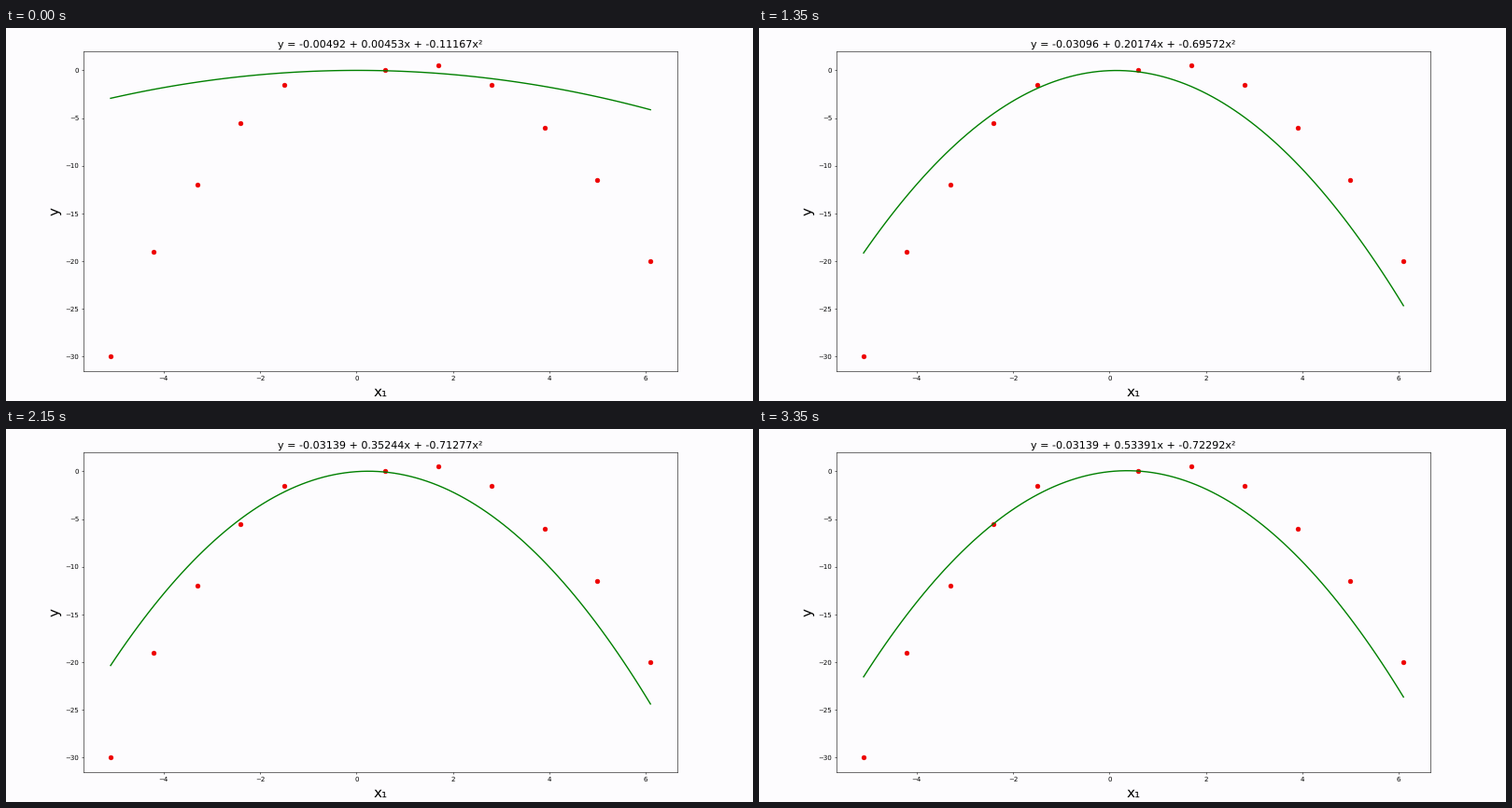
A matplotlib script that plays this animation: 800x400 px, repeating every 3450 ms.

```python
import math

import numpy as np
import matplotlib.pyplot as plt
from matplotlib.animation import FuncAnimation

plt.rcParams["font.family"] = "DejaVu Sans"
plt.rcParams["text.hinting"] = "none"

PAPER = "#fdfcfe"
STEP_MS, HOLD_MS, LOOP_MS, TICK_MS = 100, 350, 3450, 50
RATE, TOLERANCE = 5e-5, 1e-6
EPOCHS = 10            # descent steps between two plots

X = np.array([-5.1, -4.2, -3.3, -2.4, -1.5, 0.6, 1.7, 2.8, 3.9, 5.0, 6.1])
Y = np.array([-30, -19, -12, -5.5, -1.5, 0, 0.5, -1.5, -6, -11.5, -20])


def powers(x):
    return np.stack([np.ones_like(x), x, x * x], axis=1)


def descend(count):
    """Gradient descent from zero; a term stays put once its step is tiny."""
    basis = powers(X)
    w, live = np.zeros(3), np.ones(3, bool)
    path = []
    for _ in range(count):
        step = RATE * basis.T @ (Y - basis @ w) / len(X)
        live = live & (np.abs(step) > TOLERANCE)
        w = w + step * live
        path.append(w)
    return path


def plots_done(k):
    """Plots drawn by state k: about 2.4 per state, a little faster midway."""
    return round(np.interp(k, [0, 16, 22, 31], [0, 38, 54, 74]))


def cut(v):
    """Text of v with five decimals, not rounded."""
    return f"{math.trunc(v * 1e5) / 1e5:.5f}"


PATH = descend(800)

fig = plt.figure(figsize=(16, 8), dpi=50, facecolor=PAPER)
ax = fig.add_axes([83.1 / 800, 32.3 / 400, 636 / 800, 343 / 400], facecolor=PAPER)
ax.scatter(X, Y, s=44, color="#ee0000", zorder=1)
xs = np.linspace(X[0], X[-1], 100)
curve, = ax.plot(xs, 0 * xs, color="green", lw=2, zorder=2)
ax.set_xlim(-5.66, 6.66)
ax.set_ylim(-31.525, 2.025)
ax.set_xlabel("x₁", fontsize=22, labelpad=6)
ax.set_ylabel("y", fontsize=22, labelpad=6)
title = ax.set_title("", fontsize=16)


def draw(i):
    t = i * TICK_MS
    k = 0 if t < HOLD_MS else (t - HOLD_MS) // STEP_MS + 1
    w = PATH[EPOCHS * (plots_done(k) + 1)]
    c, b, a = map(cut, w)
    curve.set_ydata(powers(xs) @ w)
    title.set_text(f"y = {c} + {b}x + {a}x²")
    return curve, title


anim = FuncAnimation(fig, draw, frames=LOOP_MS // TICK_MS, interval=TICK_MS,
                     init_func=lambda: draw(0), repeat=True, repeat_delay=0)
plt.show()
```
